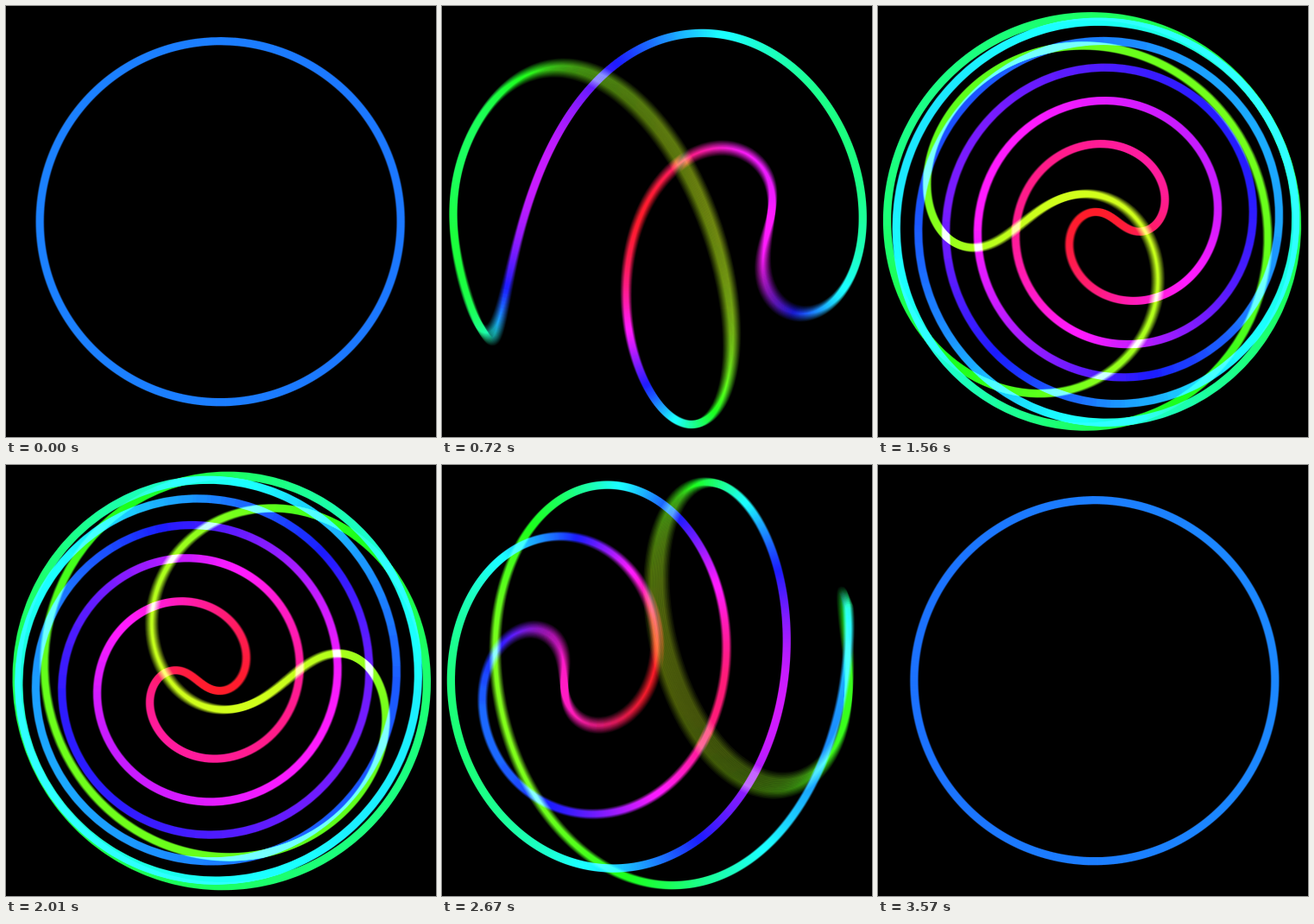
Write an HTML page with a canvas that moves like this. It is 498 px wide and 499 px high and loops after 3.6 s.

```html
<!DOCTYPE html>
<html>
<head>
<meta charset="utf-8">
<title>Twisting ring</title>
<style>
html, body { margin: 0; width: 100%; height: 100%; overflow: hidden; background: #000; }
canvas { display: block; width: 498px; height: 499px; }
</style>
</head>
<body>
<canvas id="stage" width="498" height="499"></canvas>
<script>
const W = 498, H = 499;
const FRAMES = 120, STEP = 30;      // frames per loop, ms per frame
const SAMPLES = 15, SHUTTER = 0.6;  // motion blur
const CX = 249, CY = 249.7, RADIUS = 209, CAMERA = 2.07, HALF = 4.6;
const MAX_TWIST = 11.8, SATURATION = 0.92;

const stage = document.getElementById('stage');
const ctx = stage.getContext('2d');
const layer = document.createElement('canvas');
layer.width = W;
layer.height = H;
const pen = layer.getContext('2d');

function ease(x) {
  const p = 2.65;
  return x < 0.5 ? 0.5 * Math.pow(2 * x, p) : 1 - 0.5 * Math.pow(2 - 2 * x, p);
}

// One colour channel (0-255) of a hue.
function channel(hue, shift) {
  const d = Math.abs((hue / 60 + shift) % 6 - 3) - 1;
  return 255 * (1 - SATURATION + SATURATION * Math.min(1, Math.max(0, d)));
}

// A great circle twisted about the x axis, turned about y, seen in perspective.
function ringPoints(time) {
  const twist = MAX_TWIST * ease(1 - Math.abs(2 * time - 1));
  const ca = Math.cos(Math.PI * time), sa = Math.sin(Math.PI * time);
  const n = Math.round(240 + 58 * twist);
  const pts = [];
  for (let i = 0; i < n; i++) {
    const th = 2 * Math.PI * i / n;
    const u = Math.cos(th), s = Math.sin(th);
    const v = s * Math.cos(twist * u), w = s * Math.sin(twist * u);
    const z = w * ca - u * sa;
    const k = RADIUS * CAMERA / (CAMERA - z);
    pts.push({ x: CX + k * (u * ca + w * sa), y: CY - k * v, z });
  }
  return pts;
}

// Each point gets the offset to its stroke edges.
function addEdges(pts) {
  const n = pts.length;
  pts.forEach((p, i) => {
    const a = pts[(i + n - 1) % n], b = pts[(i + 1) % n];
    const dx = b.x - a.x, dy = b.y - a.y;
    const f = HALF / (Math.hypot(dx, dy) || 1);
    p.nx = -dy * f;
    p.ny = dx * f;
  });
}

// The bias differs per sample so that rounding evens out in the sum.
function drawRing(time, bias) {
  const pts = ringPoints(time), n = pts.length;
  addEdges(pts);
  pen.globalCompositeOperation = 'source-over';
  pen.fillStyle = '#000';
  pen.fillRect(0, 0, W, H);
  pen.globalCompositeOperation = 'lighter';
  for (let i = 0; i < n; i++) {
    const p = pts[i], q = pts[(i + 1) % n];
    const hue = 215 - 71 * (p.z + q.z);
    const rgb = [0, 4, 2].map(shift => Math.round(channel(hue, shift) + bias));
    pen.fillStyle = `rgb(${rgb.join()})`;
    pen.beginPath();
    pen.moveTo(p.x + p.nx, p.y + p.ny);
    pen.lineTo(q.x + q.nx, q.y + q.ny);
    pen.lineTo(q.x - q.nx, q.y - q.ny);
    pen.lineTo(p.x - p.nx, p.y - p.ny);
    pen.fill();
  }
}

function draw(frame) {
  ctx.globalAlpha = 1;
  ctx.globalCompositeOperation = 'source-over';
  ctx.fillStyle = '#000';
  ctx.fillRect(0, 0, W, H);
  ctx.globalCompositeOperation = 'lighter';
  ctx.globalAlpha = 1 / SAMPLES;
  for (let k = 0; k < SAMPLES; k++) {
    drawRing((frame + SHUTTER * (k + 0.5) / SAMPLES) / FRAMES, k - (SAMPLES - 1) / 2);
    ctx.drawImage(layer, 0, 0);
  }
}

const start = performance.now();
let shown = -1;
function tick() {
  const frame = Math.floor((performance.now() - start) / STEP) % FRAMES;
  if (frame !== shown) {
    shown = frame;
    draw(frame);
  }
  requestAnimationFrame(tick);
}
tick();
</script>
</body>
</html>
```
